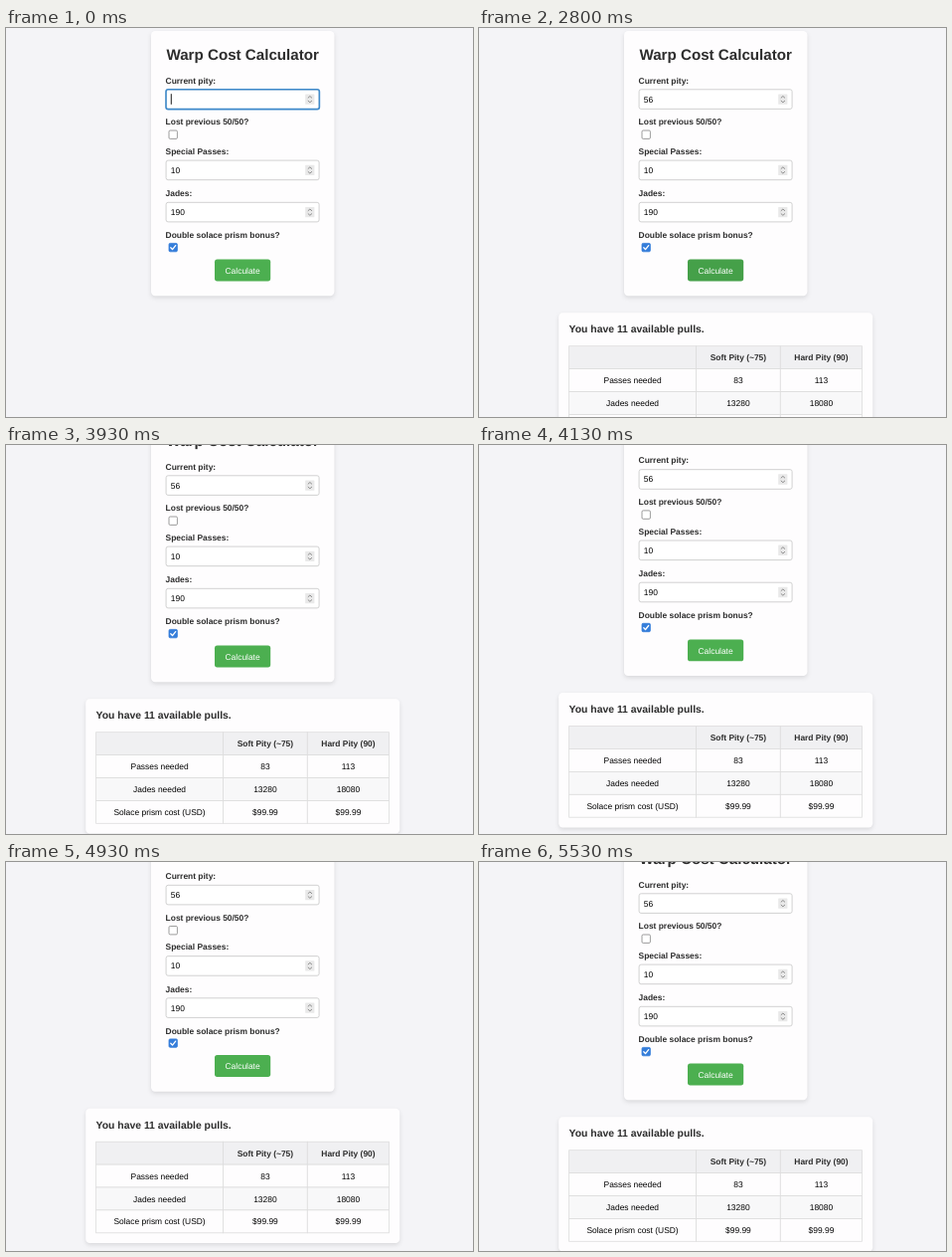
These frames come from a looping animation (470 by 391 pixels, 6670 ms). An HTML page:

```html
<!DOCTYPE html>
<html lang="en">
<head>
<meta charset="utf-8">
<title>Warp Cost Calculator</title>
<style>
  html, body { margin: 0; width: 100%; height: 100%; overflow: hidden; background: #f4f4f7; }
  svg { display: block; width: 470px; height: 391px; }
  text { font: 8.43px "Liberation Sans", Arial, sans-serif; text-rendering: geometricPrecision; }
  .bold { font-weight: bold; fill: #2d2d2d; }
  .title { font-size: 15.17px; }
  .sum { font-size: 10.4px; }
  .mid { text-anchor: middle; }
  .card { fill: #fefdfe; filter: drop-shadow(0 2px 2px rgba(0, 0, 0, .11)); }
  .field { fill: #fff; stroke: #ccc; stroke-width: .9; }
  .line { fill: none; stroke: #ddd; stroke-width: .8; }
  .mark { fill: none; stroke-linecap: round; stroke-linejoin: round; }
</style>
</head>
<body>
<svg viewBox="0 0 470 391"><g id="page"></g></svg>
<script>
const LOOP = 6670;
const page = document.getElementById('page');

const text = (x, y, str, cls = '', id = '') =>
  `<text x="${x}" y="${y}" class="${cls}" id="${id}">${str}</text>`;
const rect = (x, y, w, h, rx, attrs) =>
  `<rect x="${x}" y="${y}" width="${w}" height="${h}" rx="${rx}" ${attrs}/>`;
const label = (y, str) => text(160.6, y, str, 'bold');

function numberField(cy, value, id = '') {
  return rect(161.1, cy - 9.8, 154, 19.6, 2, 'class="field"') +
    text(165.8, cy + 3, value, '', id) +
    rect(301.2, cy - 5.2, 9.2, 10.4, .5, 'fill="#e9e9e9"') +
    `<path class="mark" stroke="#777" stroke-width=".8" d="M304.1 ${cy - 1.5}l1.8-1.6 1.8 1.6M304.1 ${cy + 1.6}l1.8 1.6 1.8-1.6"/>`;
}

function checkbox(cy, checked) {
  const style = checked ? 'fill="#347dda" stroke="#347dda"' : 'fill="#fff" stroke="#858585"';
  return rect(164, cy - 4.2, 8.4, 8.4, 1.2, style + ' stroke-width=".8"') +
    (checked ? `<path class="mark" stroke="#fff" stroke-width="1.3" d="M165.8 ${cy + .2}l1.7 1.8 3.2-4"/>` : '');
}

function table() {
  const top = 319.7, rowH = 22.9, cols = [90.6, 218.5, 303.3, 385.6];
  const rows = [
    ['', 'Soft Pity (~75)', 'Hard Pity (90)'],
    ['Passes needed', 83, 113],
    ['Jades needed', 13280, 18080],
    ['Solace prism cost (USD)', '$99.99', '$99.99']
  ];
  const fills = ['#f0f0f2', '#fefdfe', '#f8f8f9', '#fefdfe'];
  return rows.map((cells, r) => cells.map((cell, c) => {
    const y = top + r * rowH, w = cols[c + 1] - cols[c];
    return rect(cols[c], y, w, rowH, 0, `fill="${fills[r]}"`) +
      rect(cols[c], y, w, rowH, 0, 'class="line"') +
      text(cols[c] + w / 2, y + 14.5, cell, r ? 'mid' : 'mid bold');
  }).join('')).join('');
}

page.innerHTML =
  rect(146, 3, 184.4, 266.2, 4.2, 'class="card"') +
  text(238.2, 31.9, 'Warp Cost Calculator', 'bold title mid') +
  label(55.6, 'Current pity:') + numberField(71.6, '', 'pity') +
  '<g id="focus">' +
  rect(161, 61.7, 154.4, 19.9, 2.2, 'fill="none" stroke="#3f8acb" stroke-width="1.6"') +
  rect(0, 66.2, .9, 10.6, 0, 'id="caret"') + '</g>' +
  label(97.3, 'Lost previous 50/50?') + checkbox(107.2, false) +
  label(126.9, 'Special Passes:') + numberField(142.9, 10) +
  label(169.1, 'Jades:') + numberField(185.1, 190) +
  label(211.3, 'Double solace prism bonus?') + checkbox(220.6, true) +
  rect(210, 232.6, 56.2, 21.8, 2.6, 'id="button"') +
  '<g fill="#fff">' + text(238.1, 246.7, 'Calculate', 'mid') + '</g>' +
  '<g id="results">' + rect(80.2, 286.2, 316, 135.4, 4.2, 'class="card"') +
  text(90.6, 306.4, 'You have 11 available pulls.', 'bold sum') + table() + '</g>';

const [pity, focus, caret, button, results] =
  ['pity', 'focus', 'caret', 'button', 'results'].map(id => document.getElementById(id));

// Piecewise linear value through [tick, value] points.
function track(points, tick) {
  const i = points.findIndex(p => p[0] > tick);
  if (i === 0) return points[0][1];
  if (i < 0) return points[points.length - 1][1];
  const [a, va] = points[i - 1], [b, vb] = points[i];
  return va + (vb - va) * (tick - a) / (b - a);
}

const scroll = [[50, 0], [52, 2.5], [54, 2.5], [59, 31], [60, 34], [61, 36], [63, 38.2],
  [65, 39.2], [66, 40], [73, 40], [74, 38.5], [76, 38.5], [77, 35.5], [78, 32.6], [80, 31.2], [83, 30]];
const hover = [[32, 0], [36, 1], [54, 1], [58, 0]];

function draw(now) {
  const tick = Math.floor((now % LOOP + 5) * .015);
  const value = tick < 20 ? '' : tick < 25 ? '5' : '56';
  pity.textContent = value;
  caret.setAttribute('x', 165.8 + value.length * 4.69);
  focus.style.display = tick < 40 ? '' : 'none';
  results.style.display = tick < 42 ? 'none' : '';
  const h = track(hover, tick);
  button.style.fill = `rgb(${76 - 7 * h}, ${175 - 15 * h}, ${80 - 7 * h})`;
  page.setAttribute('transform', `translate(0 ${-track(scroll, tick)})`);
}

const start = performance.now();
function loop() {
  draw(performance.now() - start);
  requestAnimationFrame(loop);
}
loop();
</script>
</body>
</html>
```
